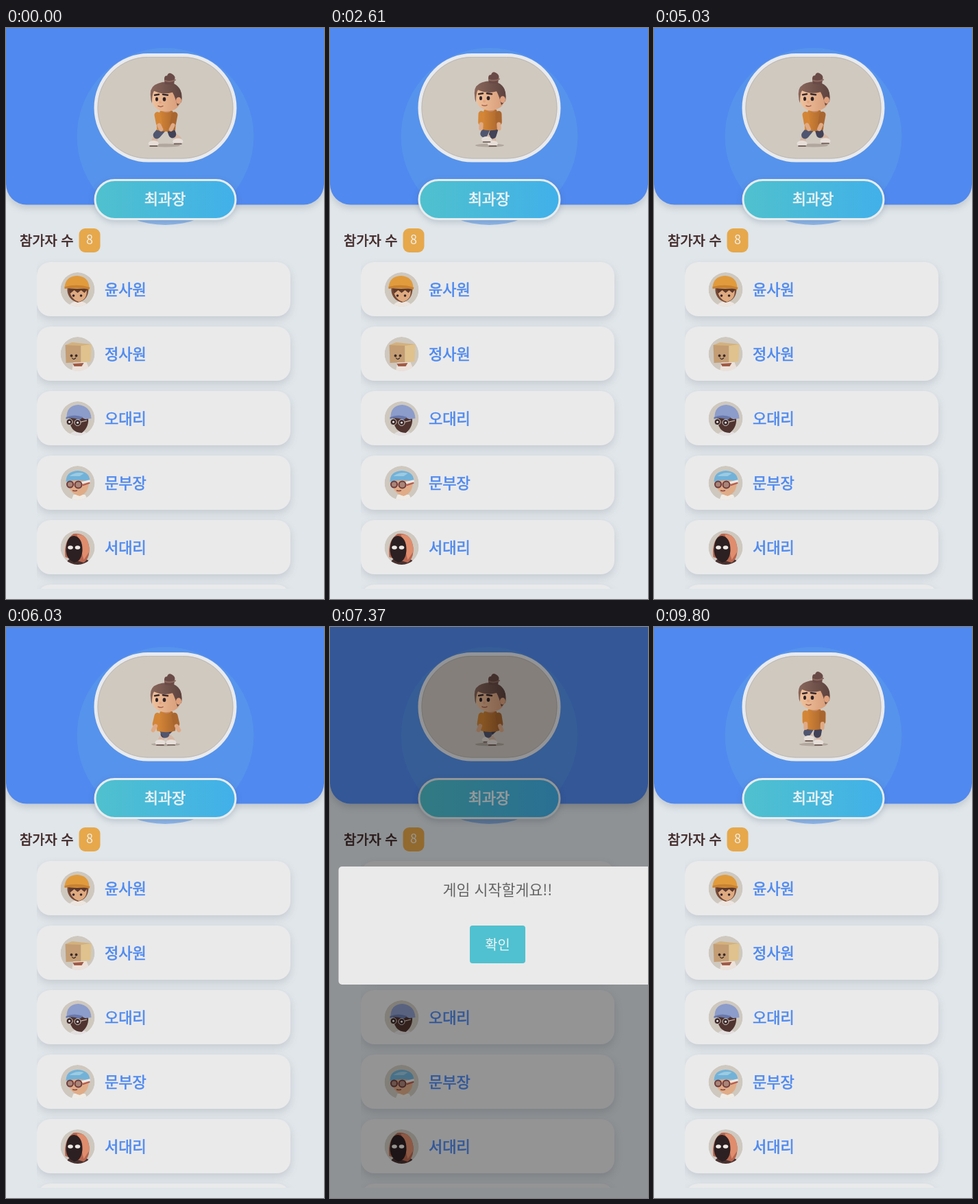
Recreate the animation shown at these times as an HTML page. Size 464 by 832 pixels, loop 9.87 s.

```html
<!DOCTYPE html>
<html lang="ko">
<head>
<meta charset="utf-8">
<style>
  html, body { margin: 0; width: 100%; height: 100%; overflow: hidden; background: #e0e6ea; }
  svg { display: block; width: 464px; height: 832px; font-family: "Noto Sans CJK KR", "Noto Sans CJK", "Noto Sans", sans-serif; }
  .medium { fill: currentColor; stroke: currentColor; stroke-width: .7; }
  .name { font-size: 22px; color: #4f8aef; }
  .mid { text-anchor: middle; }
  .card { fill: #eaeaeb; filter: drop-shadow(0 5px 6px rgba(60, 70, 90, .16)); }
  .line { fill: none; stroke-linecap: round; stroke-linejoin: round; }
</style>
</head>
<body>
<svg viewBox="0 0 464 832">
  <defs>
    <linearGradient id="teal"><stop stop-color="#4fc1cd"/><stop offset="1" stop-color="#41b0ea"/></linearGradient>
    <linearGradient id="shirt"><stop stop-color="#d98a37"/><stop offset="1" stop-color="#a9652f"/></linearGradient>
    <linearGradient id="skin"><stop stop-color="#f0c29c"/><stop offset="1" stop-color="#d79b78"/></linearGradient>
    <linearGradient id="hair"><stop stop-color="#8a675c"/><stop offset="1" stop-color="#5c423e"/></linearGradient>
    <clipPath id="list"><rect x="45" y="335" width="385" height="482"/></clipPath>
    <clipPath id="round"><circle r="25"/></clipPath>
  </defs>
  <rect width="464" height="832" fill="#e0e6ea"/>
  <path d="M0 0H464V227.500a30 30 0 0 1-30 30H30a30 30 0 0 1-30-30z" fill="#5089ef" style="filter:drop-shadow(0 5px 5px rgba(60,70,90,.18))"/>
  <circle cx="232.500" cy="158" r="129" fill="#5a9aec" opacity=".6"/>

  <rect x="131" y="39.500" width="203" height="153.500" rx="76.500" fill="#d0c9c0" stroke="#e8eaee" stroke-width="5"/>
  <rect x="134" y="42.500" width="197" height="147.500" rx="73.500" fill="none" stroke="#bdb9b4"/>

  <ellipse cx="233" cy="171" rx="21" ry="2.500" fill="#9a8c84" opacity=".55"/>
  <g id="farLeg"></g>
  <g id="nearLeg"></g>
  <g id="torso">
    <path d="M225 120Q234 117 243 120Q249 133 247 148Q234 152 220 148Q219 132 225 120z" fill="url(#shirt)"/>
    <g id="arms"></g>
    <path d="M229 114H240V121Q234 124 229 121z" fill="#c98c69"/>
    <path d="M212 96Q212 83 234 82Q256 83 255 103Q254 120 233 121Q212 120 212 96z" fill="url(#skin)"/>
    <path d="M211 99Q209 84 222 80Q236 75 248 82Q259 90 256 107L250 113Q247 100 243 93Q229 97 216 91Q213 95 213 109Q211 105 211 99z" fill="url(#hair)"/>
    <ellipse cx="252" cy="105" rx="4" ry="5" fill="#dfa17d"/>
    <path d="M232 81Q229 68 235 69Q237 63 242 66Q248 69 246 75L245 82z" fill="#6a4a46"/>
    <path d="M232 76Q239 79 247 75" class="line" stroke="#8d6a5f" stroke-width="2"/>
    <path d="M217 97L223 96M229 96L236 97" class="line" stroke="#3b2a2c" stroke-width="2.500"/>
    <ellipse cx="220" cy="103" rx="2" ry="3" fill="#2d2228"/>
    <ellipse cx="231" cy="103" rx="2.300" ry="3" fill="#2d2228"/>
    <path d="M222 113Q226 115 229 113" class="line" stroke="#a35f4b" stroke-width="1.500"/>
    <circle cx="225" cy="107.500" r="2" fill="#e6a583"/>
  </g>

  <rect x="130" y="221.500" width="205" height="57" rx="28.500" fill="url(#teal)" stroke="#e6ecef" stroke-width="3" style="filter:drop-shadow(0 3px 4px rgba(40,60,90,.2))"/>
  <text x="232" y="257" class="name medium mid" style="color:#eef2f4">최과장</text>

  <text x="20" y="317" font-size="19.800" class="medium" color="#432a2a">참가자 수</text>
  <rect x="106.500" y="292" width="31" height="35" rx="9" fill="#e6a84b"/>
  <text x="122" y="315" font-size="18" class="mid" fill="#f0eeea">8</text>
  <g id="cards" clip-path="url(#list)"></g>

  <rect id="shade" width="464" height="832" opacity="0"/>
  <g id="modal" opacity="0">
    <rect x="12.500" y="349" width="465" height="172" rx="5" fill="#eaeaea"/>
    <text x="244.500" y="390.500" font-size="21.700" class="mid" fill="#646464">게임 시작할게요!!</text>
    <rect x="204" y="435" width="81" height="55" rx="4" fill="#50c1d0"/>
    <rect id="pressed" x="203.500" y="433" width="82" height="57" rx="4" fill="#a6d1d8" stroke="#ced9e4" stroke-width="4"/>
    <text x="244.500" y="469.500" font-size="19.800" class="mid" fill="#f0f4f5">확인</text>
  </g>
  <g id="pointer" opacity="0">
    <circle r="19.500" fill="#8098c0" opacity=".4"/>
    <circle r="13" fill="#5d75a2"/>
    <circle r="10.500" fill="#3f6280"/>
  </g>
</svg>
<script>
const LOOP = 9870, STEP = 717;
const $ = id => document.getElementById(id);
const ramp = (t, from, to) => Math.min(1, Math.max(0, (t - from) / (to - from)));
const mix = (a, b, k) => a + (b - a) * k;
const fade = (id, value) => $(id).setAttribute('opacity', value);
const line = (d, color, width) => `<path class="line" d="${d}" stroke="${color}" stroke-width="${width}"/>`;

const people = [
  ['윤사원', `<path d="M-14 27Q-11 17 1 17Q13 17 18 27z" fill="#ede5df"/>
    <path d="M-15 -2Q-16 14 0 19Q16 16 16 -2z" fill="#764936"/>
    <path d="M-12 0H13Q15 14 2 18Q-10 15 -12 0z" fill="#dfaa80"/>
    <path d="M-13 -1H15L10 5L5 1L0 5L-5 1L-11 6z" fill="#5d3a2f"/>
    <path d="M-19 -3Q-18 -19 -1 -20Q16 -19 17 -3Q0 1 -19 -3z" fill="#e19b3c"/>
    <path d="M-19 -4Q0 -9 18 -3L17 0Q0 -4 -19 -1z" fill="#c98232"/>
    <circle cx="-6" cy="9" r="1.800" fill="#32232a"/><circle cx="5" cy="9" r="1.800" fill="#32232a"/>`],
  ['정사원', `<path d="M-9 27L-6 12H13L19 27z" fill="#ece2db"/>
    <path d="M-7 14L9 13L6 18L-5 18z" fill="#a05a46"/>
    <path d="M-18 -13L5 -14L5 12L-17 13z" fill="#c49d74"/>
    <path d="M5 -14L20 -14L19 11L5 12z" fill="#dfc28d"/>
    <path d="M-18 -13L-8 -17L20 -14L5 -12z" fill="#d3b17e"/>
    <circle cx="-9" cy="2.500" r="1.900" fill="#3d2b29"/><circle cx="-2" cy="2.500" r="1.900" fill="#3d2b29"/>
    ${line('M-8 6Q-6 9 -3 6', '#3d2b29', 1.3)}`],
  ['오대리', `<path d="M-15 27Q-10 18 2 18Q14 18 18 27z" fill="#e3dfe0"/>
    <path d="M-13 -4H15Q18 12 6 21Q-12 21 -13 -4z" fill="#50342f"/>
    <path d="M-16 -2Q-16 -19 1 -20Q19 -18 20 0L11 1Q1 -5 -16 -2z" fill="#8c9ccb"/>
    <path d="M-17 -2Q-5 -7 8 -2L3 2Q-9 -3 -17 1z" fill="#6979ac"/>
    <circle cx="-12" cy="5" r="4.500" fill="#3b2728" stroke="#d9d0c6"/><circle cx="0" cy="6" r="4.500" fill="#3b2728" stroke="#d9d0c6"/>
    ${line('M5 5L13 3', '#d9d0c6', 1.2)}<circle cx="-12" cy="5" r="1.600" fill="#eee"/><circle cx="0" cy="6" r="1.600" fill="#eee"/>`],
  ['문부장', `<path d="M-10 27L-6 17H11L16 27z" fill="#efebe5"/>
    <path d="M-15 -5H16Q18 14 3 19Q-14 15 -15 -5z" fill="#e0ac88"/>
    <path d="M-17 -2Q-17 -17 0 -18Q18 -17 18 -2Q0 -6 -17 -2z" fill="#72b2d8"/>
    <path d="M-12 -10Q-2 -17 9 -14L3 -10z" fill="#9ccbe2"/>
    ${line('M5 0L17 -3', '#efe9e5', 3)}${line('M8 3L17 0', '#b55a50', 2)}
    <circle cx="-11" cy="2" r="4.500" fill="#a98578" stroke="#703c3d" stroke-width="2"/><circle cx="1" cy="2.500" r="5" fill="#a98578" stroke="#703c3d" stroke-width="2"/>
    ${line('M-7 11Q-4 12 -1 11', '#8c4b42', 1.4)}`],
  ['서대리', `<path d="M-18 27Q-16 14 0 14Q18 15 20 27z" fill="#4a3230"/>
    <path d="M-18 14Q-21 -10 -6 -20Q14 -22 17 0Q18 16 9 22z" fill="#b7664f"/>
    <path d="M-1 -19Q17 -20 17 6L9 18z" fill="#df8d6d"/>
    <path d="M-17 3Q-16 -17 -5 -17Q7 -15 7 4Q6 20 -5 22Q-17 17 -17 3z" fill="#2c2022"/>
    <ellipse cx="-10.500" cy="0" rx="3.800" ry="2.800" fill="#eee9e4"/><ellipse cx="0" cy="0" rx="3.800" ry="2.800" fill="#eee9e4"/>`],
  ['', '']
];
$('cards').innerHTML = people.map(([name, face], i) => `<g transform="translate(0 ${94 * i})">
  <rect class="card" x="45" y="341" width="370" height="79" rx="20"/>
  ${name && `<g transform="translate(104.500 381)" clip-path="url(#round)"><circle r="25" fill="#cec8bf"/>${face}</g>
  <text class="name medium" x="144" y="388.500">${name}</text>`}</g>`).join('');

// swing: +1 is fully forward (left); lift raises the travelling foot
function leg(id, hip, swing, lift, jeans) {
  const footX = hip - 14 * swing, footY = 168.5 - 6 * lift;
  const kneeX = mix(hip, footX, .5) - 2 - 2 * lift, kneeY = 156 - 2 * lift;
  $(id).innerHTML = line(`M${kneeX} ${kneeY}L${footX} ${footY - 4}`, '#d6b7a3', 8)
    + line(`M${hip} 147L${kneeX} ${kneeY}`, jeans, 11)
    + `<ellipse cx="${footX - 1}" cy="${footY}" rx="7.500" ry="4.500" fill="#e6ded8"/>`
    + line(`M${footX - 6} ${footY + 3.5}H${footX + 4}`, '#75625c', 1.8);
}

function arm(shoulder, swing, sleeve) {
  const elbow = shoulder - 4 * swing, hand = shoulder - 9 * swing;
  return line(`M${shoulder} 126L${elbow} 138`, sleeve, 9)
    + line(`M${elbow} 141L${hand} 147`, '#e0aa86', 6);
}

function walk(t) {
  const turn = 2 * Math.PI * t / STEP, angle = turn - 2 * Math.PI * .91;
  const swing = Math.cos(angle), lift = -Math.sin(angle);
  leg('farLeg', 240, -swing, Math.max(0, -lift), '#414258');
  leg('nearLeg', 228, swing, Math.max(0, lift), '#50566f');
  $('arms').innerHTML = arm(246, swing * .7, '#a9662f') + arm(221, -swing * .7, '#d48636');
  const bob = 1.5 - 2.5 * Math.cos(2 * turn - .4 * Math.PI);
  $('torso').setAttribute('transform', `translate(0 ${bob})`);
}

function popScale(k) {
  if (k < .45) return mix(.7, 1.05, k / .45);
  if (k < .8) return mix(1.05, .95, (k - .45) / .35);
  return mix(.95, 1, (k - .8) / .2);
}

function dialog(t) {
  const open = ramp(t, 6950, 7250), close = ramp(t, 9085, 9235) ** 1.5;
  const scale = popScale(open) * (1 - close / 2);
  $('modal').setAttribute('transform', `translate(244.500 435) scale(${scale}) translate(-244.500 -435)`);
  fade('modal', open > 0 ? 1 - close : 0);
  fade('shade', .37 * ramp(t, 6950, 7100) * (1 - ramp(t, 9100, 9230)));
  fade('pressed', ramp(t, 8850, 8950));

  const move = ramp(t, 7970, 8490), eased = move * (2 - move);
  $('pointer').setAttribute('transform', `translate(${mix(208, 249.5, eased)} 471)`);
  fade('pointer', ramp(t, 7970, 8170) * (1 - ramp(t, 9120, 9300)));
}

function draw() {
  const t = performance.now() % LOOP;
  walk(t);
  dialog(t);
  requestAnimationFrame(draw);
}
draw();
</script>
</body>
</html>
```
